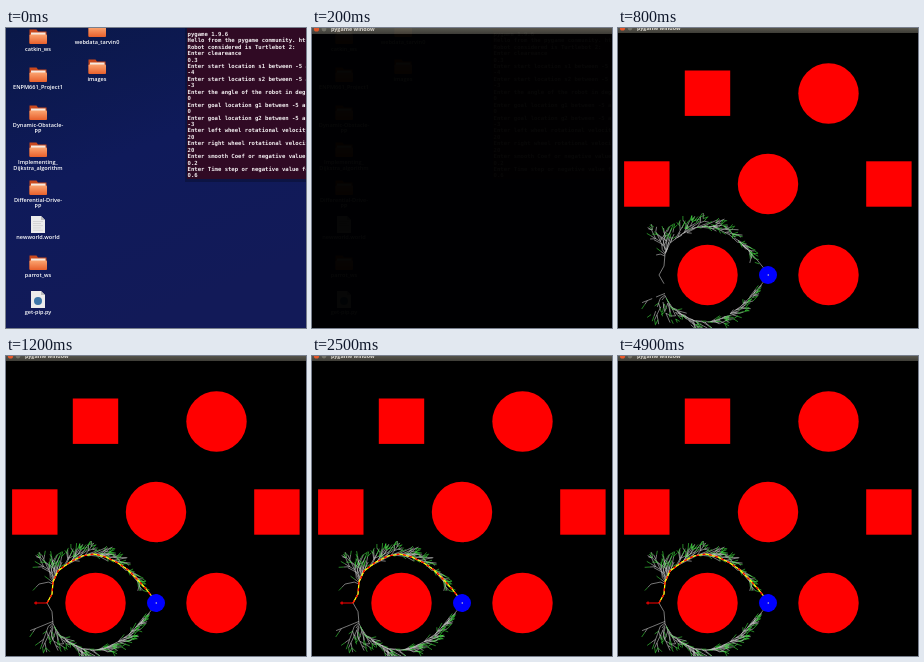
Recreate the animation shown at these times as an HTML page. Size 300 px wide and 300 px high, loop 5200 ms.

```html
<!DOCTYPE html>
<html lang="en">
<head>
<meta charset="utf-8">
<title>Path planner</title>
<style>
html, body { margin: 0; width: 100%; height: 100%; overflow: hidden; background: #000; }
svg { display: block; width: 100vw; height: 100vh; }
.label { font: 600 5.55px "Open Sans", sans-serif; fill: #fff; text-anchor: middle; }
.term { font: bold 5.6px "DejaVu Sans Mono", monospace; fill: #f2eef0; white-space: pre; }
.title { font: bold 5.4px "Open Sans", sans-serif; fill: #dfdbd2; }
.edge { fill: none; stroke-width: .6; }
</style>
</head>
<body>
<svg viewBox="0 0 300 300">
  <defs>
    <linearGradient id="sky" x1="0" y1="0" x2=".4" y2="1">
      <stop offset="0" stop-color="#0a1848"/>
      <stop offset=".5" stop-color="#0f1a5a"/>
      <stop offset="1" stop-color="#121a58"/>
    </linearGradient>
    <linearGradient id="bar" x1="0" y1="0" x2="0" y2="1">
      <stop offset="0" stop-color="#605e53"/>
      <stop offset="1" stop-color="#3e3d37"/>
    </linearGradient>
    <linearGradient id="orange" x1="0" y1="0" x2="0" y2="1">
      <stop offset="0" stop-color="#fba470"/>
      <stop offset="1" stop-color="#e8602c"/>
    </linearGradient>
  </defs>
  <g id="desk"><rect width="300" height="300" fill="url(#sky)"/></g>
  <g id="win">
    <rect width="300" height="300"/>
    <g id="scene">
      <g id="shapes" fill="#f00"></g>
      <path id="first" class="edge" stroke="#d8d8c8"/>
      <path id="white" class="edge" stroke="#c8c8c8"/>
      <path id="green" class="edge" stroke="#3fdc3f"/>
      <polyline id="route" fill="none" stroke="#ff0" stroke-width="1.2"/>
      <polyline id="dashes" fill="none" stroke="#f00" stroke-width="1.3" stroke-dasharray="3 3.5"/>
      <path id="root" d="M28 247H41M30 245.6V248.4" stroke="#f00" stroke-width="1.2"/>
      <circle cx="150" cy="247" r="9" fill="#00f"/>
      <circle cx="150.3" cy="247" r=".8" fill="#ccc"/>
    </g>
    <g id="head">
      <rect y="-2" width="300" height="7" fill="url(#bar)"/>
      <circle cx="4.5" cy="0" r="2.6" fill="#e9592a"/>
      <circle cx="12" cy="0" r="2.4" fill="#77756a"/>
      <text class="title" x="19" y="2.2">pygame window</text>
    </g>
  </g>
</svg>
<script>
const LOOP = 5200, STEP = 100;
const $ = id => document.getElementById(id);

function add(parent, tag, attrs, text) {
  const el = document.createElementNS("http://www.w3.org/2000/svg", tag);
  for (const k in attrs) el.setAttribute(k, attrs[k]);
  if (text) el.textContent = text;
  parent.appendChild(el);
  return el;
}

// Desktop icons and terminal
const desk = $("desk");

function folder(x, y) {
  add(desk, "path", { d: `M${x - 8.5} ${y + 7}v-14h7l1.5 2h8.5v12z`, fill: "#c9481d" });
  add(desk, "rect", { x: x - 7, y: y - 4, width: 14.5, height: 4, fill: "#f6e9df" });
  add(desk, "rect", { x: x - 8.5, y: y - 2, width: 17.5, height: 9.5, rx: 1, fill: "url(#orange)" });
}

function sheet(x, y, python) {
  add(desk, "path", { d: `M${x - 7} ${y - 9}h10l4 4v13h-14z`, fill: "#ececec" });
  add(desk, "path", { d: `M${x + 3} ${y - 9}v4h4z`, fill: "#bbb" });
  if (python) add(desk, "circle", { cx: x, cy: y + 1, r: 4, fill: "#3d76a8" });
  else for (let i = 0; i < 5; i++)
    add(desk, "rect", { x: x - 5, y: y - 4 + i * 2.2, width: 10 - i % 2 * 2, height: .7, fill: "#ccc" });
}

const icons = [
  [32, 9, "catkin_ws"],
  [32, 47, "ENPM661_Project1"],
  [32, 85, "Dynamic-Obstacle-|PP"],
  [32, 122, "Implementing_|Dijkstra_algorithm"],
  [32, 160, "Differential-Drive-|PP"],
  [32, 197, "newworld.world"],
  [32, 235, "parrot_ws"],
  [32, 272, "get-pip.py"],
  [91, 2, "webdata_tarvin0"],
  [91, 39, "images"]
];
for (const [x, y, name] of icons) {
  if (name.includes(".")) sheet(x, y, name.endsWith(".py"));
  else folder(x, y - .5);
  name.split("|").forEach((s, i) => add(desk, "text", { class: "label", x, y: y + 13.8 + i * 6.2 }, s));
}

add(desk, "rect", { x: 179, y: 0, width: 121, height: 154, fill: "#000", opacity: .25 });
add(desk, "rect", { x: 181, y: 0, width: 119, height: 151, fill: "#300a24" });
`pygame 1.9.6
Hello from the pygame community. https
Robot considered is Turtlebot 2:
Enter cleareance
0.3
Enter start location s1 between -5 and
-4
Enter start location s2 between -5 and
-3
Enter the angle of the robot in degrees
0
Enter goal location g1 between -5 and
0
Enter goal location g2 between -5 and
-3
Enter left wheel rotational velocity
20
Enter right wheel rotational velocity
20
Enter smooth Coef or negative value
0.2
Enter Time step or negative value for
0.6`.split("\n").forEach((s, i) =>
  add(desk, "text", { class: "term", x: 181.6, y: 7.8 + i * 6.44 }, s));

// Obstacles, by centre
const shapes = $("shapes"), SIDE = 45.4;
for (const [x, y] of [[89.5, 65.2], [28.8, 156], [270.9, 156]])
  add(shapes, "rect", { x: x - SIDE / 2, y: y - SIDE / 2, width: SIDE, height: SIDE });
for (const [cx, cy] of [[210.5, 65.5], [150, 156], [89.5, 247], [210.5, 247]])
  add(shapes, "circle", { cx, cy, r: 30.2 });

// Search tree: grown above the axis, then again mirrored below it
const CX = 89.5, CY = 247;
const spine = [[41, 0], [46, -9], [47, -21], [52, -32], [64, -41], [76, -47], [88, -49],
  [100, -46], [112, -40], [122, -33], [131, -24], [140, -14], [148, -4]];

let seed = 661;
function rand() {
  seed = seed + 0x6D2B79F5 | 0;
  let t = Math.imul(seed ^ seed >>> 15, 1 | seed);
  t = t + Math.imul(t ^ t >>> 7, 61 | t) ^ t;
  return ((t ^ t >>> 14) >>> 0) / 4294967296;
}
const spread = w => (rand() - .5) * 2 * w;
const edges = [];
let flip = 1;

function push(x, y, x2, y2, tip) {
  const f = n => n.toFixed(1);
  edges.push({ d: `M${f(x)} ${f(CY + y * flip)}L${f(x2)} ${f(CY + y2 * flip)}`, tip, rank: rand() });
}

function inside(x, y) {
  const r = Math.hypot(x - CX, y);
  const taper = Math.min(1, Math.max(0, (x - 85) / 40));
  const limit = x < 47 ? 78 : 64 - 8 * taper;
  return r > 43 && r < limit && x > 23 && y < -10;
}

// Straight runs with occasional forks; dead ends may turn green
function grow(x, y, a, depth) {
  if (!depth) return false;
  const len = 4 + rand() * 2;
  const x2 = x + Math.cos(a) * len, y2 = y + Math.sin(a) * len;
  if (!inside(x2, y2)) return false;
  let forks = 0;
  for (const turn of [-.6, 0, .6])
    if (rand() < (turn ? .3 : .8) && grow(x2, y2, a + turn, depth - 1)) forks++;
  push(x, y, x2, y2, !forks && rand() < .8);
  return true;
}

for (flip of [1, -.97]) {
  for (let i = 1; i < spine.length; i++) {
    const [x, y] = spine[i - 1], [x2, y2] = spine[i];
    const a = Math.atan2(y2 - y, x2 - x);
    push(x, y, x2, y2);
    if (i < 3) continue;
    for (let k = 0; k < 5; k++) {
      const u = rand();
      grow(x + (x2 - x) * u, y + (y2 - y) * u, a + .3 - rand() * 1.1, 4);
    }
  }
  for (let k = 0; k < 5; k++) grow(47, -19 - k * 1.5, -2.75 + k * .25, 6);
}

// Short strokes seen when the search begins
const strokes = [38, 217, 44, 219, 60, 210, 62, 205, 68, 198, 74, 201, 83, 201, 97, 201,
  101, 202, 107, 199, 138, 229, 141, 234, 141, 259, 143, 253, 128, 271, 131, 265,
  122, 281, 126, 275, 110, 290, 124, 289, 104, 292, 116, 299, 95, 296, 103, 299,
  82, 292, 88, 294, 68, 291, 74, 296, 60, 288, 66, 293, 54, 281, 62, 291,
  48, 274, 50, 280, 47, 285, 50, 277];
let start = "";
for (let i = 0; i < strokes.length; i += 4)
  start += `M${strokes[i]} ${strokes[i + 1]}L${strokes[i + 2]} ${strokes[i + 3]}`;
$("first").setAttribute("d", start);

const clamp = v => Math.min(1, Math.max(0, v));
const show = (id, on) => $(id).setAttribute("visibility", on ? "inherit" : "hidden");
const pick = (tip, part) => edges.filter(e => !!e.tip === tip && e.rank < part).map(e => e.d).join("");
let last = -1;

function draw(ms) {
  const t = Math.floor(ms % LOOP / STEP) * STEP;
  if (t === last) return;
  last = t;
  $("win").setAttribute("opacity", t < 100 ? 0 : t < 200 ? .5 : t < 300 ? .97 : 1);
  $("head").setAttribute("transform", `translate(0 ${t < 300 ? 1 : 0})`);
  show("scene", t >= 300);
  show("first", t >= 500 && t < 700);

  const part = clamp((t - 500) / 400);
  $("white").setAttribute("d", pick(false, part));
  $("green").setAttribute("d", pick(true, part));

  const n = Math.round(clamp((t - 900) / 300) * spine.length);
  const pts = spine.slice(0, n).map(([x, y]) => `${x},${CY + y}`).join(" ");
  $("route").setAttribute("points", pts);
  $("dashes").setAttribute("points", pts);
  show("root", n > 0);
}

const t0 = performance.now();
function tick() {
  draw(performance.now() - t0);
  requestAnimationFrame(tick);
}
draw(0);
requestAnimationFrame(tick);
</script>
</body>
</html>
```
